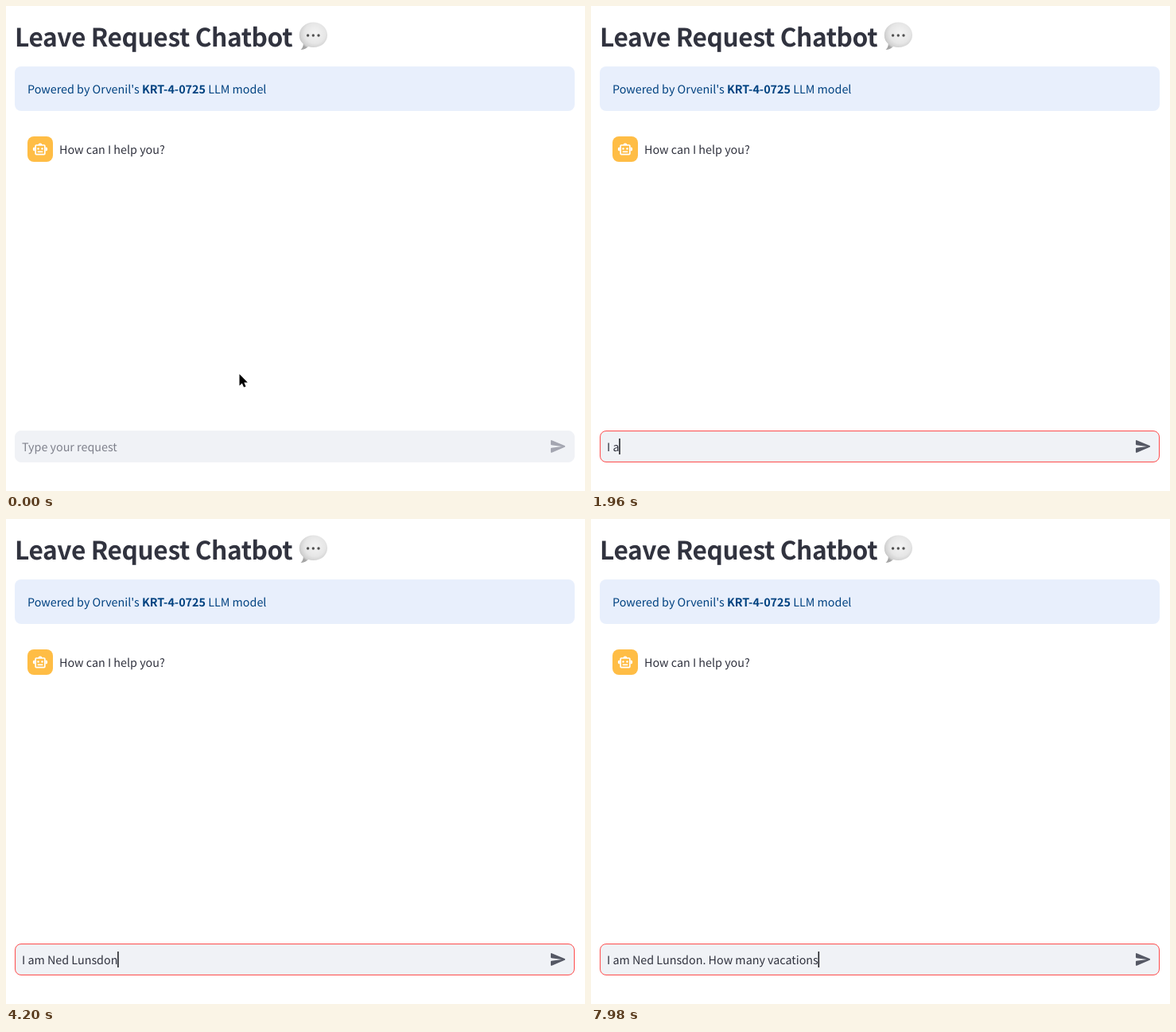
An HTML page for the animation above (8 s loop, 728 by 610 pixels).

```html
<!DOCTYPE html>
<html lang="en">
<head>
<meta charset="utf-8">
<title>Leave Request Chatbot</title>
<style>
  html, body { margin: 0; width: 100%; height: 100%; overflow: hidden; background: #fff; }
  svg { display: block; width: 728px; height: 610px; }
  text {
    font-family: "Noto Sans CJK JP", "Noto Sans CJK SC", "Noto Sans CJK", "Open Sans", sans-serif;
    font-size: 14.33px;
    fill: #31333f;
    white-space: pre;
    text-rendering: geometricPrecision;
  }
  .title { font-size: 31.7px; font-weight: 600; letter-spacing: -.4px; }
  .info { fill: #004280; }
  .info tspan { font-weight: 600; }
  #hint { fill: #7f818c; }
</style>
</head>
<body>
<svg viewBox="0 0 728 610">
  <defs>
    <radialGradient id="bubble" cx=".56" cy=".4" r=".62">
      <stop offset="0" stop-color="#f4f4f4"/>
      <stop offset=".6" stop-color="#e6e6e6"/>
      <stop offset=".88" stop-color="#cfcfcf"/>
      <stop offset="1" stop-color="#a4a4a4"/>
    </radialGradient>
  </defs>
  <rect width="728" height="610" fill="#fff"/>

  <text class="title" x="11" y="51">Leave Request Chatbot</text>
  <path fill="url(#bubble)" d="M386.5 20.5C396.500 20.500 404 27.500 404 36.500S396.500 52 386.500 52Q383 52 380 51Q376 54.800 370.500 55Q373.800 52 373.800 47.800Q368.800 43 368.800 36.500C368.800 27.500 376.500 20.500 386.500 20.500Z"/>
  <g fill="#505050">
    <circle cx="379.600" cy="37" r="1.700"/>
    <circle cx="386.300" cy="37" r="1.700"/>
    <circle cx="393" cy="37" r="1.700"/>
  </g>

  <rect x="11" y="76" width="704" height="56" rx="8" fill="#e8effc"/>
  <text class="info" x="27" y="110">Powered by Orvenil's <tspan>KRT-4-0725</tspan> LLM model</text>

  <rect x="27" y="164" width="32" height="32" rx="8" fill="#ffbd45"/>
  <g transform="translate(33 170) scale(.833)" fill="#fff">
    <path d="M9 6a3 3 0 1 1 6 0zM4 9a3 3 0 0 0 0 6zM20 9a3 3 0 0 1 0 6z"/>
    <rect x="5" y="6" width="14" height="14" rx="1" fill="none" stroke="#fff" stroke-width="2"/>
    <circle cx="9" cy="11.500" r="1.500"/>
    <circle cx="15" cy="11.500" r="1.500"/>
    <rect x="8" y="15" width="8" height="2"/>
  </g>
  <text x="67" y="186">How can I help you?</text>

  <rect id="field" x="11.500" y="534.500" width="703" height="39" rx="7.500" fill="#f0f2f6"/>
  <text id="hint" x="20" y="560">Type your request</text>
  <text id="entry" x="20" y="560"></text>
  <rect id="caret" y="544" width="1.500" height="20" fill="#16171c"/>
  <path id="send" transform="translate(683.100 542.800) scale(.93)" d="M3.400 20.400l17.450-7.480a1 1 0 0 0 0-1.840L3.400 3.600a1 1 0 0 0-1.390.910L2 9.120c0 .5.370.930.870.990L17 12 2.870 13.880c-.5.070-.870.5-.870 1l.010 4.610c0 .710.730 1.200 1.390.910z"/>

  <g id="pointer">
    <path id="arrow" d="M0 0V14.500L3.300 11.400 5.600 16.600 8 15.600 5.800 10.500H10.300Z" fill="#000" stroke="#fff" stroke-width="1.200" paint-order="stroke"/>
    <path id="beam" d="M-3-8Q0-8 0-6Q0-8 3-8M0-6V6M-3 8Q0 8 0 6Q0 8 3 8" fill="none" stroke="#222" stroke-width="1.200"/>
  </g>
</svg>
<script>
const LOOP = 8000, STEP = 70, FOCUS = 840, EXIT = 1190;
const message = "I am Ned Lunsdon. How many vacations";

// Time of each keystroke, one per character of the message
const keys = [
  1540, 1680, 1890, 2100, 2660,
  2800, 2940, 3010, 3220,
  3500, 3570, 3710, 3780, 3990, 4060, 4130,
  4760, 5040, 5250, 5880, 6020, 6160,
  6230, 6370, 6440, 6650, 6720,
  6860, 7140, 7210, 7350, 7420, 7630, 7700, 7910, 7980
];

// Pointer stops: time, x, y
const path = [
  [0, 293.5, 463], [70, 293.5, 463], [210, 291, 469], [490, 291, 469],
  [770, 262, 555], [840, 262, 555], [EXIT, 254, 612]
];

const el = id => document.getElementById(id);
const show = (id, on) => el(id).setAttribute("visibility", on ? "visible" : "hidden");
const ease = p => p * p * (3 - 2 * p);

function pointerAt(t) {
  const i = path.findIndex(stop => stop[0] > t);
  const [t0, x0, y0] = path[i - 1], [t1, x1, y1] = path[i];
  const p = ease((t - t0) / (t1 - t0));
  return [x0 + (x1 - x0) * p, y0 + (y1 - y0) * p];
}

function drawPointer(t) {
  const on = t < EXIT;
  const [x, y] = on ? pointerAt(t) : [0, 0];
  const inField = y > 534 && y < 574;
  el("pointer").setAttribute("transform", `translate(${x} ${y})`);
  show("arrow", on && !inField);
  show("beam", on && inField);
}

function draw(time) {
  const t = Math.floor(time % LOOP / STEP) * STEP;
  const typed = message.slice(0, keys.filter(k => k <= t).length);
  const focused = t >= FOCUS;
  const entry = el("entry");

  entry.textContent = typed;
  show("hint", !typed);
  show("caret", focused);
  el("caret").setAttribute("x", 19.75 + (typed ? entry.getComputedTextLength() : 0));
  el("field").setAttribute("stroke", focused ? "#ff4b4b" : "#f0f2f6");
  el("send").setAttribute("fill", typed ? "#555864" : "#a4a6b1");
  drawPointer(t);
}

const start = performance.now();
function tick() {
  draw(performance.now() - start);
  requestAnimationFrame(tick);
}
tick();
</script>
</body>
</html>
```
